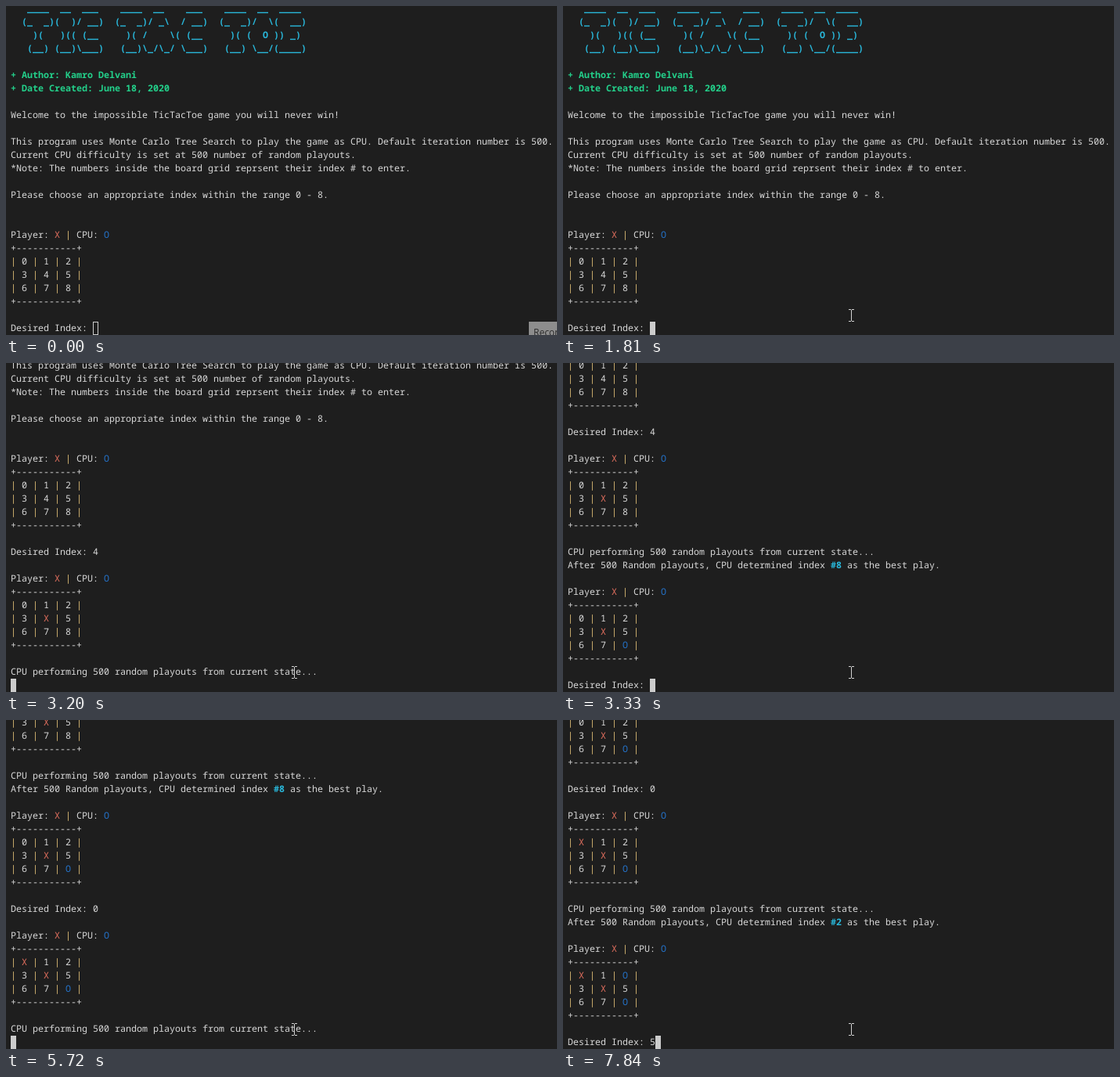
Animation of 704x420 px, one loop 8000 ms. Source, as an HTML page:

```html
<!DOCTYPE html>
<html lang="en">
<head>
<meta charset="utf-8">
<title>Tic Tac Toe terminal</title>
<style>
  html, body { margin: 0; width: 100%; height: 100%; overflow: hidden; background: #1e1e1e; }
  svg { display: block; }
  #screen { font: 500 11.667px "Noto Sans Mono", "DejaVu Sans Mono", monospace; fill: #d8d8d8; text-rendering: geometricPrecision; }
  #screen .logo { fill: #29b8db; font-weight: 600; }
  #screen .info { fill: #23d18b; font-weight: 700; }
  #screen .index { fill: #29b8db; font-weight: 700; }
  #screen .bar { fill: #e2c078; }
  #screen .x { fill: #e4705f; }
  #screen .o { fill: #2472c8; }
  #tip text { font: 12px "Open Sans", "Noto Sans", sans-serif; fill: #2c2c2c; }
</style>
</head>
<body>
<svg width="704" height="420" viewBox="0 0 704 420">
  <rect width="704" height="420" fill="#1e1e1e"/>
  <g id="screen"></g>
  <rect id="caret" stroke="#ccc"/>
  <path id="mouse" d="M0 .5h3M4 .5h3M3.5 1v14M0 15.5h3M4 15.5h3" fill="none" stroke="#d2d2d2"/>
  <g id="tip">
    <rect x="668" y="403" width="36" height="17" fill="#8d8d8d"/>
    <text x="674" y="421">Recor</text>
  </g>
</svg>
<script>
const LOOP = 8000, CELL = 7, ROW = 17, LEFT = 6, TOP = -5, BASELINE = 12, LAST_ROW = 24;
const $ = id => document.getElementById(id);

const board = cells => {
  const edge = '+-----------+';
  const row = i => `| ${[...cells.slice(i, i + 3)].join(' | ')} |`;
  return ['Player: X | CPU: O', edge, row(0), row(3), row(6), edge, ''];
};
const turn = (index, mine, reply, both) => [
  `Desired Index: ${index}`, '',
  ...board(mine),
  'CPU performing 500 random playouts from current state...',
  `After 500 Random playouts, CPU determined index #${reply} as the best play.`, '',
  ...board(both)
];

const logo = String.raw`
   ____  __  ___    ____  __    ___    ____  __  ____
  (_  _)(  )/ __)  (_  _)/ _\  / __)  (_  _)/  \(  __)
    )(   )(( (__     )( /    \( (__     )( (  O )) _)
   (__) (__)\___)   (__)\_/\_/ \___)   (__) \__/(____)`.split('\n').slice(1);

const log = [
  ...logo, '',
  '+ Author: Kamro Delvani',
  '+ Date Created: June 18, 2020', '',
  'Welcome to the impossible TicTacToe game you will never win!', '',
  'This program uses Monte Carlo Tree Search to play the game as CPU. Default iteration number is 500.',
  'Current CPU difficulty is set at 500 number of random playouts.',
  '*Note: The numbers inside the board grid reprsent their index # to enter.', '',
  'Please choose an appropriate index within the range 0 - 8.', '', '',
  ...board('012345678'),
  ...turn(4, '0123X5678', 8, '0123X567O'),
  ...turn(0, 'X123X567O', 2, 'X1O3X567O'),
  'Desired Index: 5'
];

// Time, caret row and caret column
const stages = [
  [0, 24, 15], [2800, 24, 16], [3200, 34, 0], [3330, 43, 15],
  [5460, 43, 16], [5720, 53, 0], [5790, 62, 15], [7840, 62, 16]
];
// Time, left and top of the pointer
const pointer = [
  [790, 523, 409], [860, 455, 399], [930, 405, 391],
  [1000, 375, 387], [1070, 364, 386], [1810, 365, 387]
];

const at = (keys, t) => keys.filter(k => k[0] <= t).pop();

const wordClass = { '|': 'bar', X: 'x', O: 'o' };
const lineClass = n => n < logo.length ? 'logo' : n === 5 || n === 6 ? 'info' : '';

// Each word sits on the terminal's character grid
function lineMarkup(text, n, row) {
  const group = lineClass(n);
  const y = TOP + row * ROW + BASELINE;
  return [...text.matchAll(/\S+/g)].map(({ 0: word, index }) => {
    const name = group || wordClass[word] || (/^#\d/.test(word) ? 'index' : '');
    return `<text class="${name}" x="${LEFT + index * CELL}" y="${y}">${word}</text>`;
  }).join('');
}

function drawScreen(row, col) {
  const scroll = row - LAST_ROW;
  $('screen').innerHTML = log.slice(scroll, row + 1).map((text, i) =>
    lineMarkup(i === LAST_ROW ? text.slice(0, col) : text, scroll + i, i)).join('');
}

function place(el, attrs) {
  for (const key in attrs) el.setAttribute(key, attrs[key]);
}
place($('caret'), { y: TOP + LAST_ROW * ROW + .5, width: CELL - 1, height: ROW - 1 });

let shown;
function render(t) {
  const stage = at(stages, t);
  if (stage !== shown) {
    drawScreen(stage[1], stage[2]);
    shown = stage;
  }
  place($('caret'), { x: LEFT + stage[2] * CELL + .5, fill: t < 1420 ? 'none' : '#ccc' });

  const spot = at(pointer, t);
  $('mouse').style.display = spot ? '' : 'none';
  if (spot) place($('mouse'), { transform: `translate(${spot[1]} ${spot[2]})` });

  $('tip').style.display = t < 70 ? '' : 'none';
}

const start = performance.now();
function frame() {
  render((performance.now() - start) % LOOP);
  requestAnimationFrame(frame);
}
frame();
</script>
</body>
</html>
```
